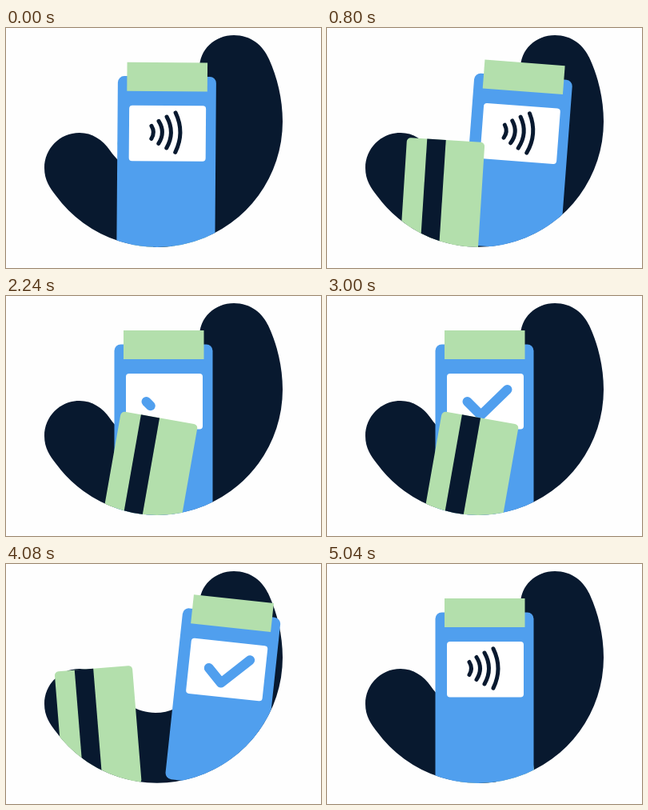
Animation, 394 px wide and 300 px high, one loop 5.6 s. Source, as an HTML page:

```html
<!DOCTYPE html>
<html lang="en">
<head>
<meta charset="utf-8">
<title>Contactless payment</title>
<style>
  html, body { margin: 0; width: 100%; height: 100%; overflow: hidden; background: #fefefe; }
  svg { display: block; width: 100vw; height: 100vh; }
  .navy { fill: #08192f; }
  .blue { fill: #509fee; }
  .green { fill: #b3dfac; }
  .line { fill: none; stroke-linecap: round; stroke-linejoin: round; }
</style>
</head>
<body>
<svg viewBox="0 0 394 300">
  <defs>
    <path id="blob" d="M48 175C48 151 67 131 92 131C108 131 121 140 130 153
      C143 172 164 186 187 186C222 186 248 156 248 118C248 88 242 72 242 50
      C242 27 261 9 285 9C306 9 321 21 329 39C339 61 346 88 346 117
      A157 157 0 0 1 62 209C55 200 48 190 48 175Z"/>
    <clipPath id="bowl"><path d="M0 0H394V117H346A157 157 0 0 1 32 117H0Z"/></clipPath>
    <clipPath id="inside"><use href="#blob"/><rect x="135.5" y="60" width="123" height="215"/></clipPath>
  </defs>
  <use href="#blob" class="navy"/>
  <g id="stage" clip-path="url(#bowl)">
    <g id="terminal">
      <rect class="blue" x="135.5" y="60.5" width="123" height="215" rx="8"/>
      <rect class="green" x="147" y="43" width="100.5" height="36"/>
      <rect fill="#fff" x="150" y="97" width="96" height="69.5" rx="4"/>
      <g id="waves" class="line" stroke="#08192f" stroke-width="5"></g>
      <g id="pulses" class="blue" clip-path="url(#inside)"></g>
      <path id="check" class="line" d="M175.5 132L192.5 149L225.5 117" stroke="#509fee"
        stroke-width="12" pathLength="1"/>
    </g>
    <g id="card">
      <rect class="green" x="-48.75" y="-74" width="97.5" height="148" rx="5"/>
      <rect class="navy" x="-23.5" y="-74" width="23.5" height="148"/>
    </g>
  </g>
</svg>
<script>
const LOOP = 5600;
const PULSE_STARTS = [1240, 1480];
const PULSE_LIFE = 560;
const CLOSING = 4360;

const CARD_TAP = { x: 179.2, y: 225.3, angle: 10 };
const CARD_AWAY = { x: 107.9, y: 202.1, angle: -7 };
const CARD_HIDDEN = { x: 202, y: 206, angle: -8.5 };

// [start, end, value reached], eased one after another from zero
const SPREAD = [[-51, 360, 1], [680, 920, 0], [3760, 4160, 1], [CLOSING, 4960, 0]];
const CHECK = [[2120, 2720, 1], [CLOSING, 4520, 0]];
const FADE = [[1680, 1960, 1], [4760, 5000, 0]];

const byId = id => document.getElementById(id);
const [stage, terminal, card, check, waves] = ['stage', 'terminal', 'card', 'check', 'waves'].map(byId);

function setAll(node, attributes) {
  for (const name in attributes) node.setAttribute(name, attributes[name]);
}

function addShape(parent, tag, attributes) {
  const node = document.createElementNS('http://www.w3.org/2000/svg', tag);
  setAll(node, attributes);
  return parent.appendChild(node);
}

// x, half height and bulge of each wave
[[178, 8, 2.5], [187, 14, 4.5], [197, 19.5, 5.5], [208, 24.7, 6]].forEach(([x, half, bulge]) =>
  addShape(waves, 'path', {
    d: `M${x} ${130.5 - half}Q${x + 2 * bulge} 130.5 ${x} ${130.5 + half}`
  }));
const pulses = PULSE_STARTS.map(() => addShape(byId('pulses'), 'circle', { cx: 191.5, cy: 161 }));

const mix = (a, b, p) => a + (b - a) * p;
const ramp = (t, from, to) => Math.min(1, Math.max(0, (t - from) / (to - from)));
const ease = p => p * p * (3 - 2 * p);

const track = (t, moves) => moves.reduce(
  (value, [from, to, target]) => mix(value, target, ease(ramp(t, from, to))), 0);

function placeCard(from, to, p, turn = p) {
  const x = mix(from.x, to.x, p), y = mix(from.y, to.y, p);
  card.setAttribute('transform', `translate(${x} ${y}) rotate(${mix(from.angle, to.angle, turn)})`);
}

function draw(t) {
  const spread = track(t, SPREAD);
  const tilt = 6.2 * Math.sin(spread * Math.PI / 2);
  terminal.setAttribute('transform', `translate(${83 * spread} 0) rotate(${tilt} 197 166)`);

  const inFront = t >= 360 && t < CLOSING;
  if (inFront) placeCard(CARD_TAP, CARD_AWAY, spread, spread ** 1.4);
  else placeCard(CARD_AWAY, CARD_HIDDEN, 1 - spread);
  const top = inFront ? card : terminal;
  if (stage.lastElementChild !== top) stage.append(top);

  waves.setAttribute('opacity', 1 - track(t, FADE));

  pulses.forEach((pulse, i) => {
    const age = ramp(t, PULSE_STARTS[i], PULSE_STARTS[i] + PULSE_LIFE);
    setAll(pulse, { r: 71 * age, opacity: .7 * (1 - age) });
  });

  const drawn = track(t, CHECK);
  setAll(check, { 'stroke-dasharray': `${drawn} 2`, opacity: drawn > 0 ? 1 : 0 });
}

const start = performance.now();
function tick() {
  draw((performance.now() - start) % LOOP);
  requestAnimationFrame(tick);
}
tick();
</script>
</body>
</html>
```
